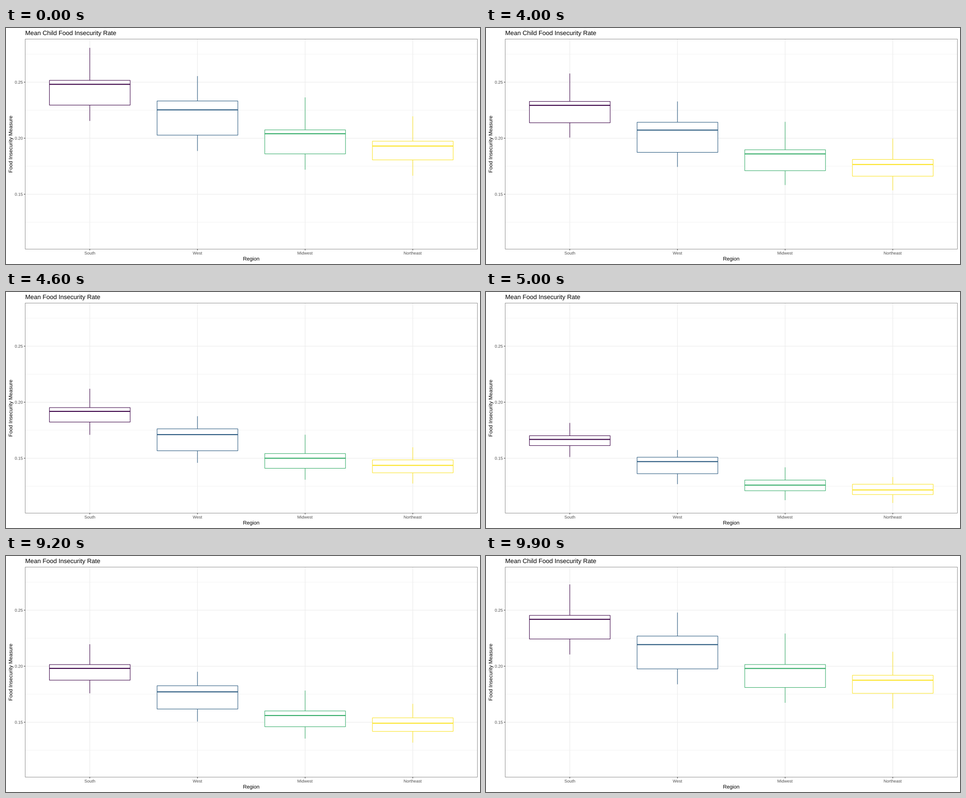
A matplotlib script that plays this animation: 1000x500 px, repeating every 10 s.

```python
import matplotlib.pyplot as plt
from matplotlib.animation import FuncAnimation
from matplotlib.patches import PathPatch, Rectangle
from matplotlib.textpath import TextPath
from matplotlib.transforms import Affine2D

WIDTH, HEIGHT, DPI = 1000, 500, 100
FRAMES, INTERVAL = 100, 100
HOLD, MOVE = 37, 13  # frames at rest, frames in transition
PX = 72 / DPI

LEFT, RIGHT, TOP, BOTTOM = 40.5, 994.5, 23.5, 468.4
UNIT = (RIGHT - LEFT) / 4.2
BOX_HALF = 0.375 * UNIT
LINE = 1.07
GRID, AXIS, TICK_TEXT = "#EBEBEB", "#333333", "#4D4D4D"

TITLES = ("Mean Child Food Insecurity Rate", "Mean Food Insecurity Rate")

# region, colour, (median, box height) for children, then for everyone
REGIONS = [
    ("South", "#3E0649", (0.2481, 0.0221), (0.1668, 0.0088)),
    ("West", "#2A5A80", (0.2253, 0.0305), (0.1470, 0.0147)),
    ("Midwest", "#38AE6B", (0.2040, 0.0214), (0.1260, 0.0095)),
    ("Northeast", "#FCE427", (0.1930, 0.0167), (0.1217, 0.0092)),
]

fig = plt.figure(figsize=(WIDTH / DPI, HEIGHT / DPI), dpi=DPI, facecolor="white")
ax = fig.add_axes([0, 0, 1, 1])
ax.set(xlim=(0, WIDTH), ylim=(HEIGHT, 0))
ax.axis("off")


def to_y(value):
    return 114.8 + (0.25 - value) * 2374


def line(xs, ys, color, width=LINE, z=1):
    return ax.plot(xs, ys, color=color, lw=width * PX, zorder=z,
                   solid_capstyle="butt", snap=False)[0]


def label(x, y, text, size, color="black", align=0.5, angle=0):
    """Draw text on a baseline; align 0, 0.5, 1 is left, centre, right."""
    path = TextPath((0, 0), text, size=size, prop={"family": "Liberation Sans"})
    ink = path.get_extents()
    place = (Affine2D().translate(-align * (ink.x0 + ink.x1), 0)
             .scale(1, -1).rotate_deg(-angle).translate(x, y))
    return ax.add_patch(PathPatch(place.transform_path(path), fc=color, lw=0,
                                  zorder=7, snap=False))


def child_summary(i, median, height):
    """Max, upper quartile, median, lower quartile, min."""
    q3 = median + (0.26 if i % 2 else 0.16) * height
    q1 = q3 - height
    return q3 + (0.0222 if i % 2 else 0.0290), q3, median, q1, q1 - 0.0141


def overall_summary(i, median, height):
    q3 = median + 0.0033 + 0.0006 * i
    q1 = q3 - height
    upper = 0.0064 if i % 2 else 0.0114
    return q3 + upper, q3, median, q1, q1 - 0.0102 + 0.0009 * i


class Box:
    def __init__(self, x, color, start, end):
        self.start, self.end = start, end
        sides = (x - BOX_HALF, x + BOX_HALF)
        self.upper = line((x, x), (0, 0), color, z=3)
        self.lower = line((x, x), (0, 0), color, z=3)
        self.body = Rectangle((sides[0], 0), 2 * BOX_HALF, 0, fc="white", ec=color,
                              lw=LINE * PX, zorder=4, snap=False)
        ax.add_patch(self.body)
        self.median = line(sides, (0, 0), color, 2 * LINE, z=5)

    def place(self, t):
        top, q3, mid, q1, low = (to_y(a + (b - a) * t)
                                 for a, b in zip(self.start, self.end))
        self.upper.set_ydata((top, q3))
        self.lower.set_ydata((q1, low))
        self.median.set_ydata((mid, mid))
        self.body.set_y(q3)
        self.body.set_height(q1 - q3)


for i in range(4):
    y = to_y(0.125 + 0.05 * i)
    line((LEFT, RIGHT), (y, y), GRID, LINE / 2)

for i in range(3):
    value = 0.15 + 0.05 * i
    y = to_y(value)
    line((LEFT, RIGHT), (y, y), GRID, z=2)
    line((LEFT - 2.75, LEFT), (y, y), AXIS, z=6)
    label(35.5, y + 3.15, f"{value:.2f}", 8.8, TICK_TEXT, align=1)

boxes = []
for i, (name, color, child, overall) in enumerate(REGIONS):
    x = LEFT + (0.6 + i) * UNIT
    line((x, x), (TOP, BOTTOM), GRID, z=2)
    line((x, x), (BOTTOM, BOTTOM + 2.75), AXIS, z=6)
    label(x, 479.9, name, 8.8, TICK_TEXT)
    boxes.append(Box(x, color, child_summary(i, *child),
                     overall_summary(i, *overall)))

ax.add_patch(Rectangle((LEFT, TOP), RIGHT - LEFT, BOTTOM - TOP, fill=False,
                       ec=AXIS, lw=LINE / 2 * PX, zorder=6, snap=False))
label((LEFT + RIGHT) / 2, 492.6, "Region", 11)
label(13.4, (TOP + BOTTOM) / 2, "Food Insecurity Measure", 11, angle=90)
titles = [label(LEFT, 15, text, 13.2, align=0) for text in TITLES]


def progress(frame):
    half, step = divmod(frame, HOLD + MOVE)
    t = max(0, step - HOLD) / MOVE
    return 1 - t if half else t


def update(frame):
    t = progress(frame)
    for box in boxes:
        box.place(t)
    titles[0].set_visible(t < 0.5)
    titles[1].set_visible(t >= 0.5)
    return []


anim = FuncAnimation(fig, update, frames=FRAMES, interval=INTERVAL,
                     init_func=lambda: update(0), repeat=True, repeat_delay=0)
plt.show()
```
